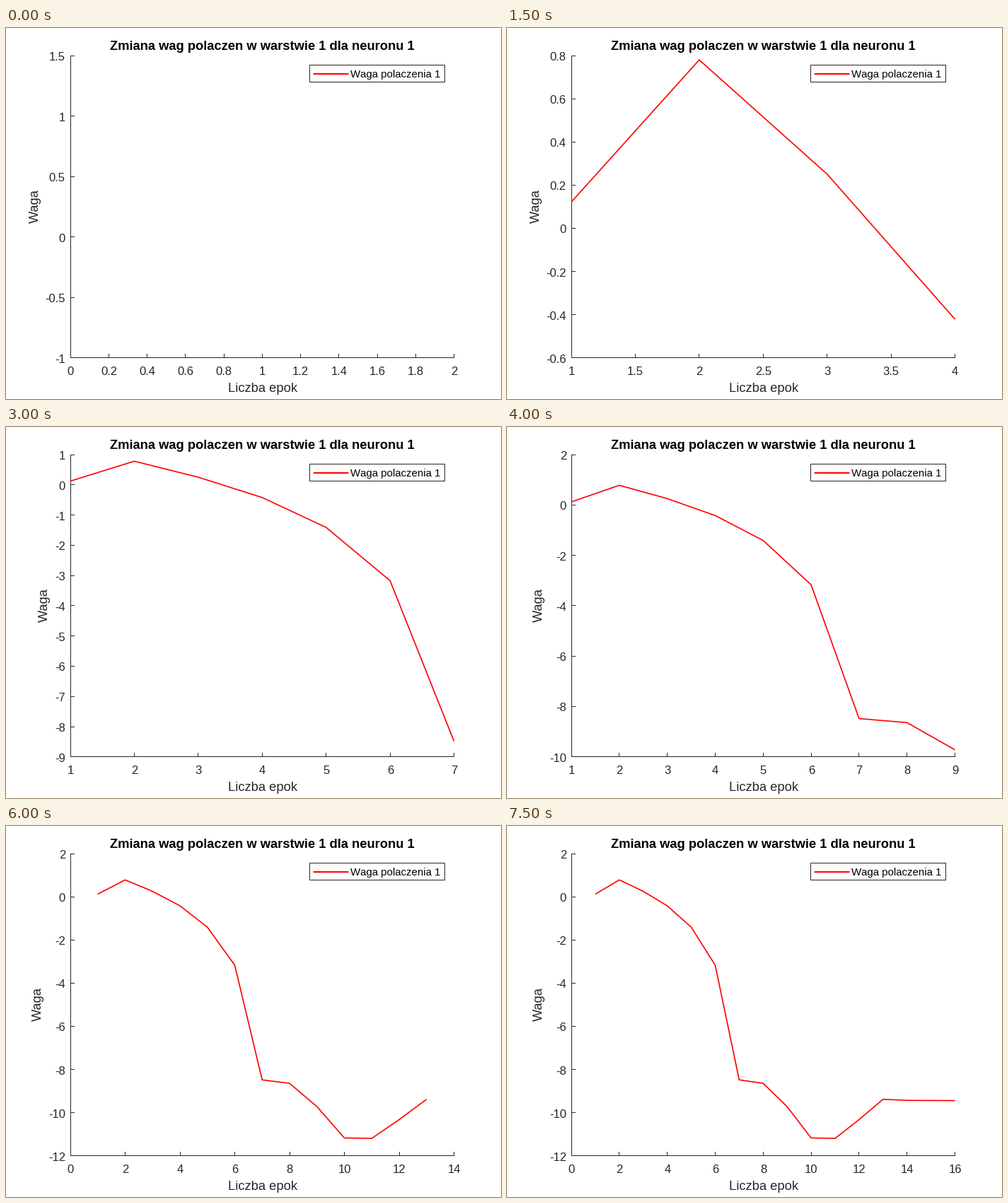
Animation of 700x525 px, one loop 8000 ms. Source, as a matplotlib script:

```python
import math

import matplotlib.pyplot as plt
from matplotlib.animation import FuncAnimation

W, H, DPI = 700, 525, 100
LEFT, RIGHT, TOP, BOTTOM = 91, 633.5, 39, 466.8
TICK = 5.5
INK = (0.15, 0.15, 0.15)
PT = 72 / DPI
TICK_PX, LABEL_PX, LEGEND_PX = 16.67, 18.33, 15

WEIGHTS = [0.122, 0.78, 0.251, -0.421, -1.41, -3.17, -8.48, -8.64,
           -9.72, -11.17, -11.19, -10.32, -9.38, -9.43, -9.435, -9.44]

plt.rcParams["font.family"] = "Liberation Sans"
plt.rcParams["text.kerning_factor"] = 6  # practically no kerning
fig = plt.figure(figsize=(W / DPI, H / DPI), dpi=DPI, facecolor="white")
ax = fig.add_axes([0, 0, 1, 1])


def nice_step(span):
    """Smallest 1-2-5 step that cuts the span into at most ten parts."""
    base = 10.0 ** math.floor(math.log10(span / 10) + 1e-9)
    return next(m * base for m in (1, 2, 5, 10) if span / (m * base) < 10 + 1e-9)


def make_ticks(lo, hi, step=None):
    step = step or nice_step(hi - lo)
    first = math.floor(lo / step + 1e-9)
    last = math.ceil(hi / step - 1e-9)
    return [round(i * step, 6) for i in range(first, last + 1)]


def axis_ticks(n):
    if n == 1:
        return make_ticks(0, 2), make_ticks(-1, 1.5, 0.5)
    seen = WEIGHTS[:n]
    xt = make_ticks(1, n, 5 if n == 15 else None)
    return xt, make_ticks(min(seen), max(seen))


def scale(lo, hi, a, b):
    return lambda v: a + (v - lo) / (hi - lo) * (b - a)


def pixel(v):
    """Centre of the pixel that holds a coordinate."""
    return math.floor(v + 1e-6) + 0.5


def advance(label):
    """Width of a number label in pixels."""
    return TICK_PX * sum({"-": 0.333, ".": 0.278}.get(c, 0.556) for c in label)


def text(x, y, s, px, color=INK, **kw):
    ax.text(x, y, s, fontsize=px * PT, color=color, va="baseline", **kw)


def stroke(xs, ys, color=INK, px=1.0, **kw):
    ax.plot(xs, ys, color=color, lw=px * PT, snap=False,
            solid_capstyle="butt", solid_joinstyle="round", **kw)


def draw_axes(xt, yt, fx, fy):
    x0, y0 = pixel(LEFT), pixel(BOTTOM)
    stroke([x0, x0], [pixel(TOP) - 0.5, y0 + 0.5])
    stroke([x0 - 0.5, pixel(RIGHT) + 0.5], [y0, y0])
    for v in xt:
        x, label = fx(v), f"{v:g}"
        stroke([pixel(x)] * 2, [y0, y0 - TICK])
        text(x + 0.25 - advance(label) / 2, 491, label, TICK_PX)
    for v in yt:
        y, label = fy(v), f"{v:g}"
        stroke([x0, x0 + TICK], [pixel(y)] * 2)
        text(84 - advance(label), y + 7, label, TICK_PX)

    widest = max(advance(f"{v:g}") for v in yt)
    text(147, 31, "Zmiana wag polaczen w warstwie 1 dla neuronu 1",
         LABEL_PX, "black", weight="bold")
    text(313.8, 515, "Liczba epok", LABEL_PX)
    text(LEFT - 16.8 - widest, 276.4, "Waga", LABEL_PX,
         rotation=90, rotation_mode="anchor")


def draw_legend():
    ax.add_patch(plt.Rectangle((429.5, 52.5), 191, 24, facecolor="white",
                               edgecolor=INK, lw=PT, snap=False, zorder=4))
    stroke([434.5, 484.5], [65, 65], "red", 2, zorder=5)
    text(487.4, 70, "Waga polaczenia 1", LEGEND_PX, "black", zorder=5)


def draw(i):
    n = i + 1
    ax.clear()
    ax.set_xlim(0, W)
    ax.set_ylim(H, 0)
    ax.axis("off")
    xt, yt = axis_ticks(n)
    fx = scale(xt[0], xt[-1], LEFT, RIGHT)
    fy = scale(yt[0], yt[-1], BOTTOM, TOP)
    draw_axes(xt, yt, fx, fy)
    if n > 1:
        stroke([fx(k + 1) for k in range(n)], [fy(w) for w in WEIGHTS[:n]],
               "red", 1.67, zorder=3)
    draw_legend()
    return []


anim = FuncAnimation(fig, draw, frames=len(WEIGHTS), init_func=lambda: [],
                     interval=500, repeat=True, repeat_delay=0)
plt.show()
```
